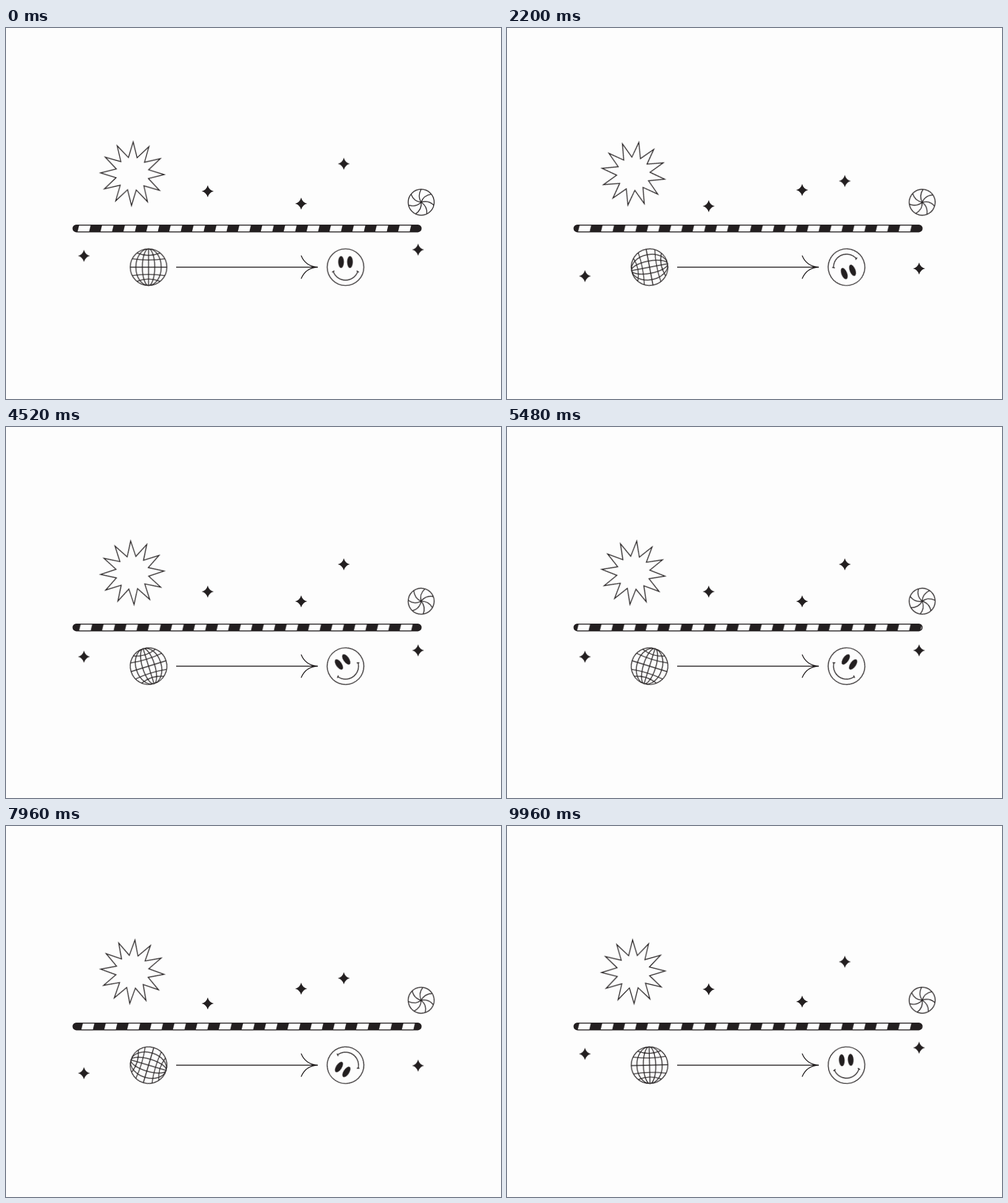
Animation, 800 px wide and 600 px high, one loop 10000 ms. Source, as an HTML page:

```html
<!DOCTYPE html>
<html lang="en">
<head>
<meta charset="utf-8">
<title>Geometric loop</title>
<style>
  html, body { margin: 0; width: 100%; height: 100%; overflow: hidden; background: #fdfdfd; }
  svg { display: block; width: 800px; height: 600px; }
  .line { fill: none; stroke: #231f20; stroke-width: 1.4; }
  .solid { fill: #231f20; }
</style>
</head>
<body>
<svg id="stage" viewBox="0 0 800 600">
  <clipPath id="tube"><rect x="108.2" y="318.7" width="562.8" height="11" rx="5.5"/></clipPath>
</svg>
<script>
const stage = document.getElementById('stage');
const TAU = Math.PI * 2;

function add(parent, tag, attrs) {
  const el = document.createElementNS('http://www.w3.org/2000/svg', tag);
  for (const key in attrs) el.setAttribute(key, attrs[key]);
  return parent.appendChild(el);
}
const path = (parent, d, cls = 'line') => add(parent, 'path', { d, class: cls });
const group = (x, y) =>
  add(add(stage, 'g', { transform: `translate(${x} ${y})` }), 'g', {});
const polar = (r, deg) => {
  const a = deg * TAU / 360;
  return [(r * Math.sin(a)).toFixed(2), (-r * Math.cos(a)).toFixed(2)];
};

function loop(el, from, to, duration, options = {}) {
  el.animate([{ transform: from }, { transform: to }],
    { duration, iterations: Infinity, ...options });
}
const spin = (el, duration, start = 0) =>
  loop(el, `rotate(${start}deg)`, `rotate(${start + 360}deg)`, duration);

function drawBurst() {
  const g = group(204.2, 235.7);
  const points = Array.from({ length: 24 }, (_, i) => polar(i % 2 ? 27 : 51.5, i * 15));
  add(g, 'polygon', { points: points.join(' '), class: 'line', 'stroke-miterlimit': 10 });
  spin(g, 5000, 1.45);
}

function drawCandy() {
  const g = group(671, 281.8);
  add(g, 'circle', { r: 21, class: 'line' });
  for (let i = 0; i < 7; i++) {
    const a = i * 360 / 7;
    path(g, `M0 0Q${polar(12, a - 32)} ${polar(21, a)}`);
  }
  spin(g, 5000);
}

function drawPole() {
  const clip = add(stage, 'g', { 'clip-path': 'url(#tube)' });
  const stripes = add(clip, 'g', {});
  for (let x = 60; x < 690; x += 37) {
    path(stripes, `M${x} 330.5l3 -12.5h18.4l-3 12.5z`, 'solid');
  }
  loop(stripes, 'translateX(0px)', 'translateX(37px)', 10000 / 9);
  add(stage, 'rect', { x: 108.2, y: 318.7, width: 562.8, height: 11, rx: 5.5, class: 'line' });
}

function drawGlobe() {
  const g = group(230.4, 386.8);
  add(g, 'circle', { r: 29.6, class: 'line' });
  for (const rx of [10, 20.5]) add(g, 'ellipse', { rx, ry: 29.6, class: 'line' });
  path(g, 'M0 -29.6V29.6M-29.6 0H29.6');
  for (const s of [-1, 1]) {
    path(g, `M-26.3 ${s * 13.6}Q0 ${s * 9.6} 26.3 ${s * 13.6}`);
    path(g, `M-18.8 ${s * 22.8}Q0 ${s * 15.5} 18.8 ${s * 22.8}`);
  }
  spin(g, 10000);
}

function drawSmiley() {
  const g = group(548.7, 386.8);
  add(g, 'circle', { r: 29.6, class: 'line' });
  for (const cx of [-7.2, 7.2]) add(g, 'ellipse', { cx, cy: -8.4, rx: 4.6, ry: 9.6, class: 'solid' });
  path(g, 'M-19.8 7A21 21 0 0 0 19.8 7M-21.6 8.2L-18 5.8M21.6 8.2L18 5.8');
  spin(g, 5000);
}

function drawArrow() {
  path(stage, 'M275 386.8H504M477 368C481 378 488 386 504 386.8C488 387.6 481 395.600 477 405.6');
}

// x, start y, travel
const sparkles = [
  [326, 264, 25], [477, 284, -22.8], [546, 219.5, 29],
  [126, 368.5, 34], [666, 358.5, 31.6]
];
function drawSparkle([x, y, travel]) {
  const g = group(x, y);
  path(g, 'M0 -9.8Q2 -2 9.8 0Q2 2 0 9.800Q-2 2 -9.8 0Q-2 -2 0 -9.8Z', 'solid');
  loop(g, 'translateY(0px)', `translateY(${travel}px)`, 2500,
    { direction: 'alternate', easing: 'cubic-bezier(.364,0,.636,1)' });
}

drawBurst();
drawCandy();
drawPole();
drawGlobe();
drawArrow();
drawSmiley();
sparkles.forEach(drawSparkle);
</script>
</body>
</html>
```
